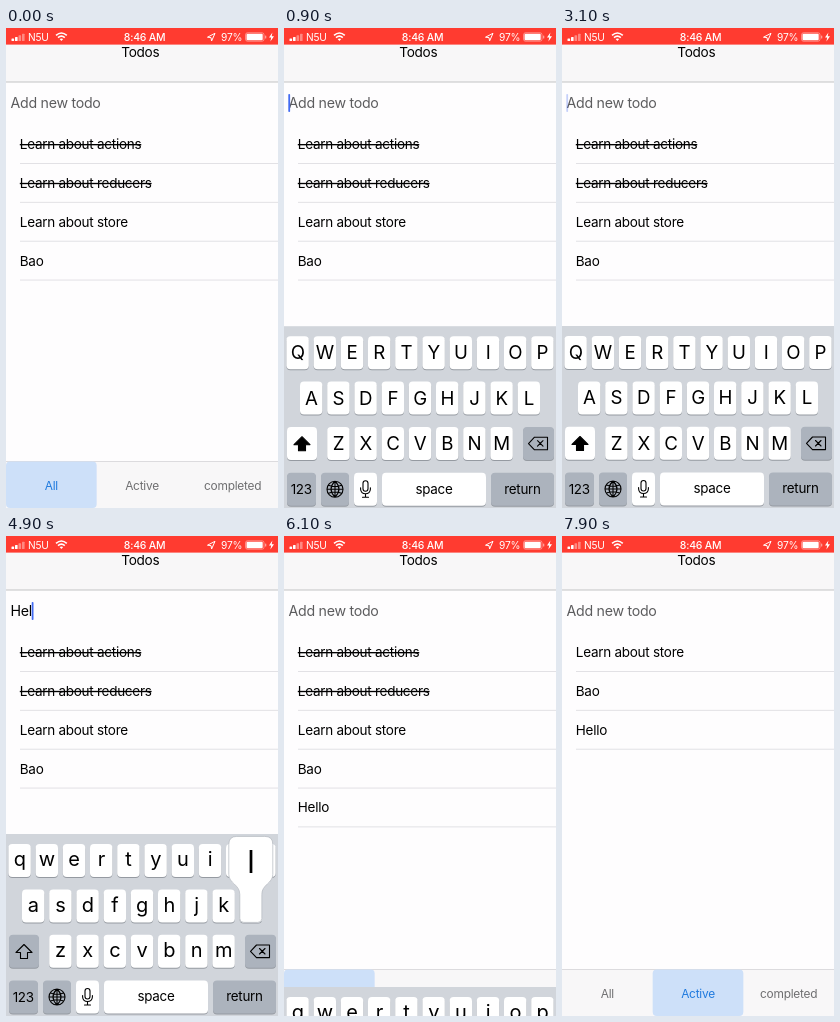
An HTML page that plays this animation: 272 by 480 pixels, repeating every 8000 ms.

```html
<!DOCTYPE html>
<html lang="en">
<head>
<meta charset="utf-8">
<title>Todos</title>
<style>
html, body { margin: 0; width: 100%; height: 100%; overflow: hidden; background: #fefdfe; }
svg { display: block; width: 272px; height: 480px; }
text { font-family: Inter, Roboto, "Liberation Sans", sans-serif; letter-spacing: -.02em; }
.mid { text-anchor: middle; }
.done { text-decoration: line-through; }
.icon { fill: none; stroke: #000; stroke-width: 1.1; stroke-linejoin: round; stroke-linecap: round; }
</style>
</head>
<body>
<svg id="stage" viewBox="0 0 272 480"></svg>
<script>
const LOOP = 8000;
const ROWS = [['qwertyuiop', 13.6, 308], ['asdfghjkl', 27.2, 353.4], ['zxcvbnm', 54.4, 398.8]];
const PITCH = 27.2, KEY_H = 33, KEY_W = 22.4, BOARD_TOP = 298, BOARD_H = 182;
const TODOS = [['Learn about actions', true], ['Learn about reducers', true], ['Learn about store'], ['Bao']];

// [time, typed text, key whose bubble shows]
const TYPING = [[0, '', ''], [4500, 'H', 'h'], [4700, 'He', 'e'], [4900, 'Hel', 'l'],
  [5100, 'Hell', 'o'], [5300, 'Hello', ''], [5900, '', '']];
// [time, caret opacity]
const CARET = [[0, 0], [500, 1], [1700, 0], [2100, .4], [2300, 1], [3100, .3],
  [3300, 0], [3900, .4], [4100, 1], [5900, 0]];

const stage = document.getElementById('stage');
const at = (track, t) => track.filter(k => k[0] <= t).pop();
const rect = (x, y, w, h, fill, r = 0, more = '') =>
  `<rect x="${x}" y="${y}" width="${w}" height="${h}" rx="${r}" fill="${fill}" ${more}/>`;
const path = (d, more = 'class="icon"') => `<path d="${d}" ${more}/>`;
const text = (x, y, size, str, more = '') =>
  `<text x="${x}" y="${y}" font-size="${size}" ${more}>${str}</text>`;
const mid = (x, y, size, str, more = '') => text(x, y, size, str, `class="mid" ${more}`);
const key = (x, y, w, fill = '#fff') =>
  rect(x, y + 1, w, KEY_H, '#959aa1', 4) + rect(x, y, w, KEY_H, fill, 4);

// Critically damped slide, 0 to 1
function settle(ms) {
  const k = Math.max(0, ms) * .0183;
  return 1 - (1 + k) * Math.exp(-k);
}

function statusBar() {
  const bars = [0, 1, 2, 3].map(i =>
    rect(5.5 + i * 3.5, 10.5 - i * 1.6, 2.6, 2.5 + i * 1.6, '#fff', .6, i > 1 ? 'opacity=".4"' : ''));
  const white = 'fill="#fff"';
  const arc = 'fill="none" stroke="#fff" stroke-width="1.6"';
  return rect(0, 0, 272, 16.6, '#ff3b30') + bars.join('') +
    text(22, 12.9, 10.2, 'N5U', white) +
    path('M50 7.4Q55.4 2.6 60.8 7.4M52 9.6Q55.4 6.6 58.8 9.6', arc) +
    path('M53.6 11.1Q55.4 9.7 57.2 11.1L55.4 13Z', white) +
    mid(138.6, 12.9, 10.5, '8:46 AM', white + ' font-weight="500"') +
    path('M201.5 9.2L209 5.3L205.6 13L205 9.6Z', 'fill="none" stroke="#fff"') +
    text(215, 12.9, 10.2, '97%', white) +
    rect(239.5, 4.8, 18.5, 8.4, 'none', 2, 'stroke="#fff" stroke-width=".8" opacity=".5"') +
    rect(240.5, 5.8, 16.2, 6.4, '#fff', 1) + rect(259, 7.5, 1.3, 3, '#fff', .6, 'opacity=".5"') +
    path('M266.4 4.5L263 9.4H265.2L264.4 13.4L268 8.2H265.7Z', white);
}

function list(t) {
  let items = t >= 5900 ? [...TODOS, ['Hello']] : TODOS;
  if (t >= 7700) items = items.filter(([, done]) => !done);
  return items.map(([name, done], i) => {
    const y = i * 38.85;
    return text(13.8, 121 + y, 13.5, name, done ? 'class="done"' : '') +
      rect(14, 135 + y, 258, 1, '#e2e1e5');
  }).join('');
}

function tabs(t) {
  const active = t >= 7700 ? 1 : 0, w = 272 / 3;
  return rect(0, 433, 272, 47, '#f8f7f8') + rect(0, 433, 272, 1, '#dcdbde') +
    rect(active * w, 433.5, w, 46.5, '#cde0f9', 4) +
    ['All', 'Active', 'completed'].map((name, i) =>
      mid((i + .5) * w, 461.5, 11.9, name, `fill="${i === active ? '#1f7ade' : '#6f6f71'}"` +
        (t === 7500 && i === 1 ? ' opacity=".5"' : ''))).join('');
}

function letters(upper) {
  return ROWS.map(([row, x0, y]) => [...row].map((c, i) => {
    const x = x0 + i * PITCH;
    return key(x - KEY_W / 2, y, KEY_W) +
      (upper ? mid(x, y + 23, 18.7, c.toUpperCase()) : mid(x, y + 22.2, 20, c));
  }).join('')).join('');
}

function bubble(c) {
  const [row, x0, y] = ROWS.find(r => r[0].includes(c));
  const x = x0 + row.indexOf(c) * PITCH;
  const shape = `M${x - 14} ${y - 53}h28q8 0 8 8v30c0 9 -11 10 -11 20v24q0 4 -4 4h-14` +
    `q-4 0 -4 -4v-24c0 -10 -11 -11 -11 -20v-30q0 -8 8 -8z`;
  return path(shape, 'fill="#fff" stroke="#b4b8bf" stroke-width=".7"') +
    mid(x, y - 16.5, 31, c);
}

function keyboard(t, pressed) {
  const drop = BOARD_H * (1 - settle(t - 405) + settle(t - 5920));
  if (t < 500 || drop > 181.5) return '';
  const upper = t < 4500, grey = '#acb3bd', y = 444.5;
  const shift = path('M18 408.5L26 416.5H21.5V422.5H14.5V416.5H10Z',
    `class="icon" style="fill:${upper ? '#000' : 'none'}"`);
  const erase = path('M244.5 415.3L250.5 409H263.5V421.6H250.5ZM253.5 412.5L259 418M259 412.5L253.5 418');
  const globe = path('M43 461a8 8 0 1 0 16 0a8 8 0 1 0 -16 0H59M51 453V469' +
    'M51 453q-8 8 0 16q8 -8 0 -16M44.5 457q6.5 2.5 13 0M44.5 465q6.5 -2.5 13 0');
  const mic = rect(79, 452.5, 5, 10.5, 'none', 2.5, 'stroke="#000" stroke-width="1.1"') +
    path('M76.6 459.5V461Q77 465.5 81.5 465.5T86.4 461V459.5M81.5 465.5V469M78.5 469H84.5');
  return `<g transform="translate(0 ${drop})">` +
    rect(0, BOARD_TOP, 272, BOARD_H, '#d1d5db') + letters(upper) +
    key(3, 398.8, 30, upper ? '#fff' : grey) + shift + key(239, 398.8, 31, grey) + erase +
    key(3, y, 29, grey) + mid(17.2, y + 21.6, 13.4, '123') +
    key(37, y, 28, grey) + globe + key(70, y, 23) + mic +
    key(98, y, 104) + mid(150, y + 20.8, 13.4, 'space') +
    key(207, y, 63, t === 5700 ? '#fff' : grey) + mid(238.5, y + 20.8, 13.4, 'return') +
    (pressed ? bubble(pressed) : '') + '</g>';
}

function draw(t) {
  const [, typed, pressed] = at(TYPING, t);
  stage.innerHTML = rect(0, 0, 272, 480, '#fefdfe') +
    rect(0, 16, 272, 38, '#f8f7f8') + rect(0, 53.5, 272, 1, '#c4c3c6') +
    mid(134.3, 28.8, 13.6, 'Todos') + statusBar() +
    text(4.6, 80, 14.2, typed || 'Add new todo', `id="field" fill="${typed ? '#000' : '#5c5c5e'}"`) +
    rect(4.3, 66, 1.8, 18, '#426bf2', .8, `id="caret" opacity="${at(CARET, t)[1]}"`) +
    list(t) + tabs(t) + keyboard(t, pressed);
  if (typed) {
    const width = document.getElementById('field').getComputedTextLength();
    document.getElementById('caret').setAttribute('x', 4.3 + width);
  }
}

// The screen refreshes five times a second
let shown = -1;
function tick() {
  const now = performance.now() % LOOP;
  const t = now < 500 ? 0 : Math.floor((now - 100) / 200) * 200 + 100;
  if (t !== shown) draw(shown = t);
  requestAnimationFrame(tick);
}
tick();
</script>
</body>
</html>
```
